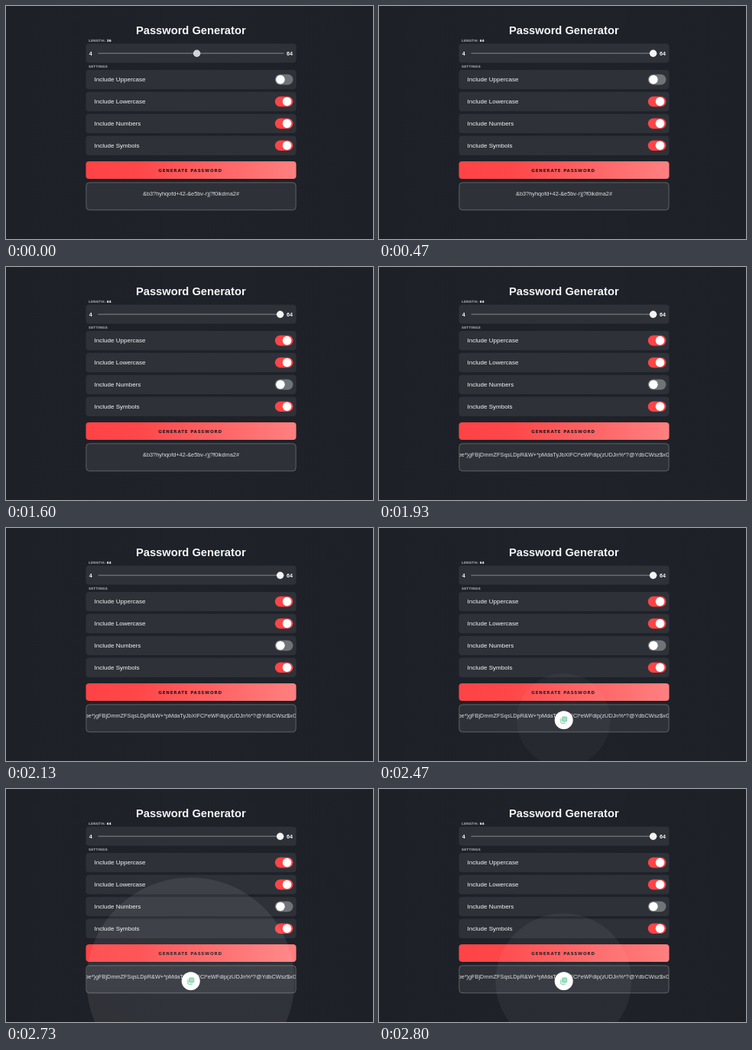
Recreate the animation shown at these times as an HTML page. Size 480 by 306 pixels, loop 2.87 s.

```html
<!DOCTYPE html>
<html lang="en">
<head>
<meta charset="utf-8">
<title>Password Generator</title>
<style>
  html, body { margin: 0; width: 100%; height: 100%; overflow: hidden; background: #1e2228; }
  svg { display: block; width: 100vw; height: 100vh; }
  text { font-family: "Liberation Sans", Arial, sans-serif; fill: #f6f7f8; }
  .wide { font-family: "DejaVu Sans", sans-serif; font-weight: bold; }
  .cap { font-size: 4.3px; letter-spacing: .15px; fill: #a4a7ab; }
  .panel { fill: #2e3238; }
  .mid { text-anchor: middle; }
</style>
</head>
<body>
<svg id="stage" viewBox="0 0 480 306">
  <defs>
    <linearGradient id="bg">
      <stop offset="0" stop-color="#1d2026"/>
      <stop offset=".5" stop-color="#1f2229"/>
      <stop offset="1" stop-color="#1d2127"/>
    </linearGradient>
    <linearGradient id="red">
      <stop offset="0" stop-color="#fe4345"/>
      <stop offset=".25" stop-color="#fe4749"/>
      <stop offset="1" stop-color="#ff8080"/>
    </linearGradient>
    <clipPath id="box"><rect x="105" y="232" width="274" height="36"/></clipPath>
  </defs>
  <rect width="480" height="306" fill="url(#bg)"/>
  <text class="mid" x="241.8" y="36.8" font-size="14.7" font-weight="bold">Password Generator</text>

  <text class="wide cap" x="108" y="46.6">LENGTH: <tspan id="count" fill="#fff">36</tspan></text>
  <rect class="panel" x="104.5" y="49.5" width="275" height="25" rx="4"/>
  <g font-size="7.1" font-weight="bold">
    <text x="108.7" y="64.9">4</text>
    <text x="367" y="64.9">64</text>
  </g>
  <rect x="120.5" y="61.6" width="243" height="1" fill="#85888a"/>
  <circle id="thumb" cy="62.2" r="4.7"/>

  <text class="wide cap" x="108" y="81">SETTINGS</text>
  <g id="rows"></g>

  <rect x="104.5" y="204" width="275" height="23" rx="4" fill="url(#red)"/>
  <text class="wide" x="199.3" y="217.6" font-size="5.5" letter-spacing=".86" style="fill:#17191d">GENERATE PASSWORD</text>

  <rect class="panel" x="104.9" y="231.9" width="274.2" height="36" rx="4" stroke="#6c7272" stroke-width=".8"/>
  <g clip-path="url(#box)">
    <text id="pass" class="mid" x="242" y="249" font-size="7.35" style="fill:#dcdee1"></text>
  </g>

  <circle id="halo" cx="241.3" cy="252.3" fill="#fff"/>
  <g id="copy">
    <circle r="12" fill="#fff"/>
    <rect x="-2" y="-4.2" width="6" height="6" rx="1" fill="#a5e0c0" stroke="#63c493" stroke-width=".8"/>
    <path d="M-3.9 -2v5a1 1 0 0 0 1 1h5" fill="none" stroke="#63c493" stroke-width=".9"/>
  </g>
</svg>
<script>
const LOOP = 2870, FPS = 15;
const $ = id => document.getElementById(id);
const set = (el, attrs) => { for (const k in attrs) el.setAttribute(k, attrs[k]); };
const clamp = v => Math.min(1, Math.max(0, v));
const smooth = v => v * v * (3 - 2 * v);

// CSS "ease": cubic-bezier(.25, .1, .25, 1)
function ease(x) {
  x = clamp(x);
  let lo = 0, hi = 1, u;
  for (let i = 0; i < 24; i++) {
    u = (lo + hi) / 2;
    const bx = .75 * u * (1 - u) ** 2 + .75 * u * u * (1 - u) + u ** 3;
    if (bx < x) lo = u; else hi = u;
  }
  return .3 * u * (1 - u) ** 2 + 3 * u * u * (1 - u) + u ** 3;
}

const SHORT = "&b3?hyhqofd+42-&e5bv-r)j?f0ikdma2#";
const LONG = "be*)gFBjDmmZFSqsLDpR&W+*pMdaTyJbXlFCl*eWFdip(zUDJn%*?@YdbCWsz$xG";

$("rows").innerHTML = ["Uppercase", "Lowercase", "Numbers", "Symbols"].map((name, i) => {
  const y = 96.6 + i * 28.87;
  return `<rect class="panel" x="104.5" y="${y - 12.7}" width="275" height="25.4" rx="4"/>
    <text x="115.6" y="${y + 2.8}" font-size="8.04">Include ${name}</text>
    <rect class="pill" x="351.8" y="${y - 6.8}" width="23.6" height="13.6" rx="6.8"/>
    <circle class="knob" cy="${y}" r="5.8" fill="#fff"/>`;
}).join("");
const pills = document.querySelectorAll(".pill");
const knobs = document.querySelectorAll(".knob");

function toggle(i, on) {
  set(pills[i], { fill: on ? "#fe4447" : "#707377" });
  set(knobs[i], { cx: on ? 367.5 : 358.9 });
}

function draw(ms) {
  const tick = Math.floor((ms + 4) * FPS / 1000);
  const t = tick * 1000 / FPS;

  const len = Math.round(36 + 28 * smooth(clamp(t / 466)));
  $("count").textContent = len;
  set($("thumb"), { cx: 125 + (len - 4) / 60 * 233.6, fill: tick ? "#f4f4f4" : "#d2d4d6" });

  toggle(0, tick >= 13);
  toggle(1, true);
  toggle(2, tick < 24);
  toggle(3, true);
  $("pass").textContent = tick >= 28 ? LONG : SHORT;

  // Copy button pops in, then its halo swells while pressed and falls back
  const pop = ease((t - 2230) / 170);
  set($("copy"), { transform: `translate(241.7 252.3) scale(${pop})`, opacity: pop });
  const press = ease((t - 2380) / 370) * (1 - ease((t - 2706) / 370));
  set($("halo"), { r: press ? 12 + 132 * press : 0, "fill-opacity": .085 * press });
}

function loop(now) {
  draw(now % LOOP);
  requestAnimationFrame(loop);
}
draw(0);
requestAnimationFrame(loop);
</script>
</body>
</html>
```
